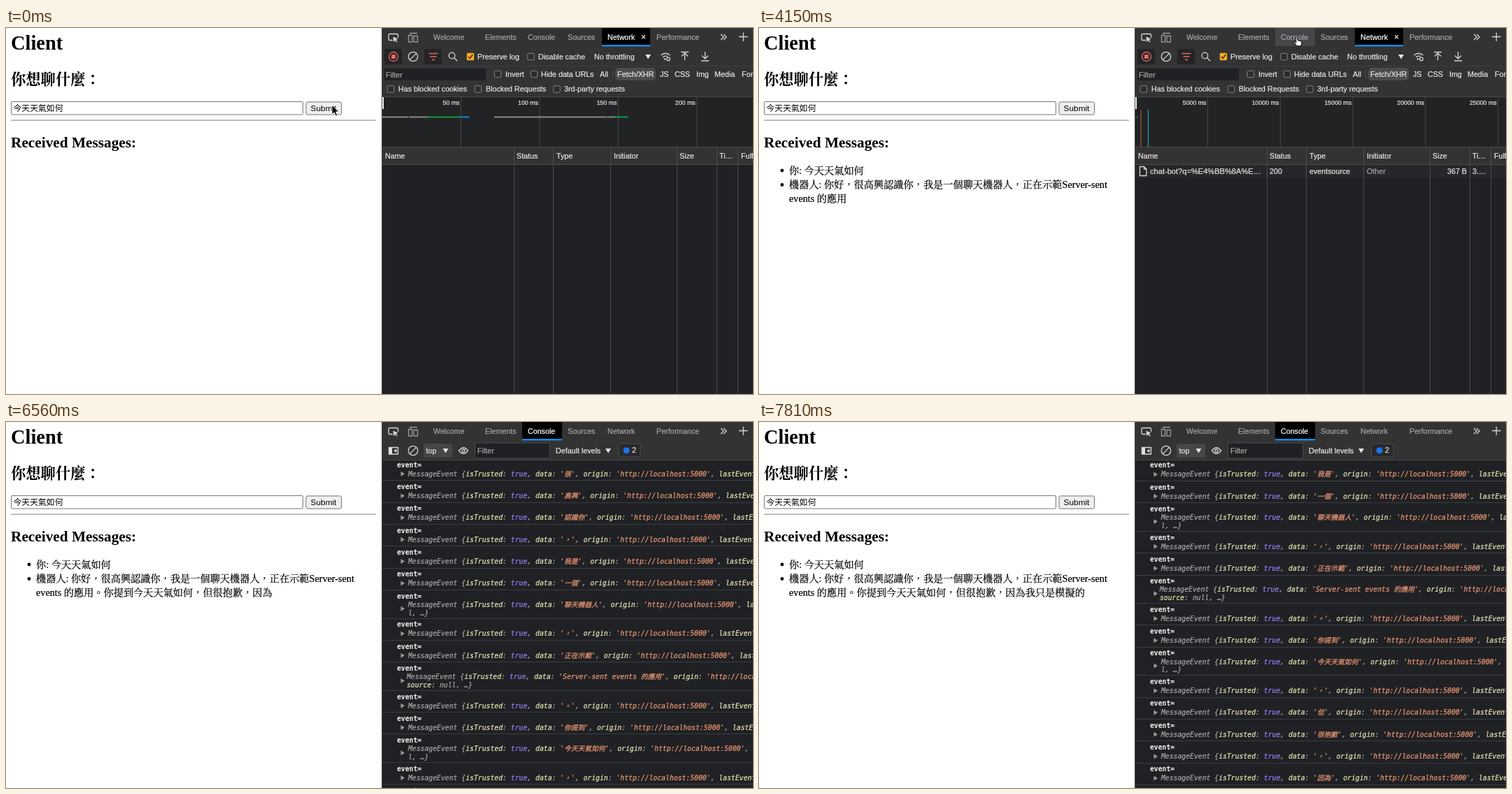
These frames come from a looping animation (1068x524 px, 8000 ms). An HTML page:

```html
<!DOCTYPE html>
<html lang="zh-Hant">
<head>
<meta charset="utf-8">
<title>Client</title>
<style>
  html, body { margin: 0; width: 100%; height: 100%; overflow: hidden; background: #fff; }
  svg { display: block; width: 1068px; height: 524px; }
  text { white-space: pre; }
  /* A hairline stroke in the text colour gives the slightly heavy smoothing. */
  text, tspan { fill: currentColor; stroke: currentColor; stroke-width: .22px; }
  .page { font: 14.2px "Liberation Serif", "Noto Serif CJK TC", "Noto Sans CJK TC", serif; color: #000; }
  .head { font-size: 21.3px; font-weight: 700; stroke: none; }
  .title { font-size: 28.4px; }
  .form { font: 11.83px "Liberation Sans", "Noto Sans CJK TC", sans-serif; color: #000; stroke: none; }
  .ui { font: 10.7px "Liberation Sans", "Noto Sans CJK TC", sans-serif; color: #e8e8e8; }
  .tick { font-size: 8.8px; }
  .dim { color: #a6a6a6; }
  .log { font: 9.76px "DejaVu Sans Mono", "Noto Sans CJK TC", monospace; color: #f4f4f4; }
  .event { font-weight: 700; stroke: none; }
  .obj { font-style: italic; color: #a9a9a9; }
  .key { color: #e9e8b6; }
  .bool { color: #9980ff; }
  .str { color: #ef9a78; }
  .icon { fill: none; stroke: #d6d6d6; stroke-width: 1.3; }
  .red { stroke: #e46962; }
</style>
</head>
<body>
<svg id="stage" viewBox="0 0 1068 524"></svg>
<script>
const LOOP = 8000;
const TOKENS = ['你好', '，', '很', '高興', '認識你', '，', '我是', '一個', '聊天機器人', '，', '正在示範',
  'Server-sent events 的應用', '。', '你提到', '今天天氣如何', '，', '但', '很抱歉', '，', '因為', '我', '只是', '模擬', '的'];
const TIMES = [860, 1160, 1460, 1760, 2060, 2350, 2680, 3010, 3280, 3540, 3890, 4150,
  4470, 4800, 5040, 5300, 5660, 5990, 6230, 6560, 6830, 7180, 7450, 7810];
const SCROLLS = [6230, 6560, 6920, 7180, 7450, 7810];
const QUESTION = '今天天氣如何';
const LONG = 11;              // the message that always wraps
const NARROW_WRAPS = [8, 14]; // messages that wrap once the scrollbar shows

const text = (x, y, s, attrs = '') => `<text x="${x}" y="${y}" ${attrs}>${s}</text>`;
const label = (x, mid, s, cls = '') => text(x, mid + 3.8, s, `class="ui ${cls}"`);
const rect = (x, y, w, h, fill, more = '') =>
  `<rect x="${x}" y="${y}" width="${w}" height="${h}" fill="${fill}" ${more}/>`;
const path = (d, cls = '', more = '') => `<path d="${d}" class="icon ${cls}" ${more}/>`;
const check = (x, y) => rect(x - 4.7, y - 4.7, 9.4, 9.4, '#2c2c2e', 'rx="1.5" stroke="#858585"');
const drop = (x, y) => `<path d="M${x - 4} ${y - 3}h8l-4 6.5z" fill="#e4e4e4"/>`;
const vline = (x, y1, y2, c) => rect(x, y1, 1, y2 - y1, c);
const clearIcon = '<g class="icon"><circle cx="582" cy="41" r="6.7"/><path d="M577.4 45.6L586.6 36.4"/></g>';

function pageMarkup() {
  return rect(0, 0, 537, 524, '#fff') +
    text(7, 31, 'Client', 'class="page head title"') +
    text(7, 81, '你想聊什麼：', 'class="page head"') +
    rect(7.5, 105.5, 417, 18.5, '#fff', 'rx="1.5" stroke="#767676"') +
    text(10.5, 119, QUESTION, 'class="form"') +
    rect(429, 105.9, 50.5, 18.2, '#efefef', 'id="button" rx="2" stroke="#767676"') +
    text(435.6, 119, 'Submit', 'class="form"') +
    rect(7, 131.5, 522, 1.2, '#949494') +
    text(7, 170.6, 'Received Messages:', 'class="page head"') +
    `<g id="asked"><circle cx="33" cy="204" r="2.4"/>${text(43, 208.5, '你: ' + QUESTION, 'class="page"')}</g>` +
    '<g id="reply"><circle cx="33" cy="224.5" r="2.4"/>' +
    text(43, 228.7, '', 'id="line1" class="page"') + text(43, 248.5, '', 'id="line2" class="page"') + '</g>';
}

function tabMarkup() {
  return rect(537, 0, 531, 524, '#202124') + rect(537, 0, 531, 27, '#333334') +
    path('M553 17.5h-4.5q-1.5 0-1.5-1.5v-6q0-1.5 1.5-1.5h10.5q1.5 0 1.5 1.5v4') +
    '<path d="M553.5 12.5l7 3-3 1.2 2.2 2.8-1.3 1-2.2-2.8-1.9 2.5z" fill="#d6d6d6"/>' +
    path('M578 9v-1.5h10M575.5 10.5h5v9.5h-5zM583 11.5h5.5v8.5h-5.5z', '', 'style="stroke:#9a9a9a"') +
    rect(852, 0, 69, 26, '#000', 'id="netTab"') + rect(738, 0, 57, 26, '#000', 'id="conTab"') +
    label(611, 13, 'Welcome', 'dim') + label(685, 13, 'Elements', 'dim') +
    text(746, 16.8, 'Console', 'id="conName" class="ui"') + label(803, 13, 'Sources', 'dim') +
    text(860, 16.8, 'Network', 'id="netName" class="ui"') + label(930, 13, 'Performance', 'dim') +
    path('M909 10.3l5 5m0-5l-5 5', '', 'id="close"') +
    path('M1022 9l4 4-4 4M1026 9l4 4-4 4') + path('M1048 12.5h12.5M1054.2 6.5v12.5') +
    rect(852, 24, 69, 2.5, '#1a86e8', 'id="underline"');
}

function networkMarkup() {
  const heads = [[542, 'Name'], [730, 'Status'], [787, 'Type'], [869, 'Initiator'], [963, 'Size'], [1020, 'Ti…'], [1051, 'Fulfilled']];
  const types = [[849, 'All'], [874, 'Fetch/XHR'], [935, 'JS'], [956, 'CSS'], [987, 'Img'], [1013, 'Media'], [1052, 'Font']];
  const put = (list, mid) => list.map(([x, s]) => label(x, mid, s)).join('');
  const ticks = (first, gap, n, step) => Array.from({ length: n }, (_, i) => {
    const x = first + gap * i;
    return vline(x, 99, 170, '#46474a') + text(x - 1.5, 110.2, `${step * (i + 1)} ms`, 'class="ui tick" text-anchor="end"');
  }).join('');
  const bar = (x1, x2, c) => rect(x1, 126.5, x2 - x1, 2, c);
  return rect(537, 27, 531, 71, '#333334') + rect(537, 54, 531, 1, '#3d3d3f') +
    rect(541, 30, 25, 22, '#242426', 'rx="2"') + rect(598, 30, 25, 22, '#242426', 'rx="2"') +
    '<circle cx="554" cy="41" r="6.5" class="icon red"/><rect x="551" y="38" width="6" height="6" rx="1" fill="#e46962"/>' +
    clearIcon + path('M604.5 36.5h13M606.5 41h9M609 45.5h4', 'red') +
    '<circle cx="637.5" cy="39.5" r="4.3" class="icon"/>' + path('M640.7 42.8l4.5 4.5') +
    rect(658.8, 35.8, 10.4, 10.4, '#f9ab17', 'rx="1.5"') + path('M661 41l2.3 2.5 4-5.5', '', 'style="stroke:#222"') +
    label(674, 41, 'Preserve log') + check(750.5, 41) + label(761, 41, 'Disable cache') +
    label(841, 41, 'No throttling') + drop(918, 41) +
    path('M936.5 39q6.5-5.5 13 0M939 42q3.5-3 7-1') + '<circle cx="942" cy="44.5" r="1.3" fill="#d6d6d6"/><circle cx="947" cy="44.5" r="2.3" class="icon"/>' +
    path('M970.5 46v-9.5M966 40.5l4.5-4.5 4.5 4.5M965 34.5h11') +
    path('M999.5 34v9.5M995 39.5l4.5 4.5 4.5-4.5M994 47h11') +
    rect(541, 58, 145, 17, '#202124') + label(543, 67, 'Filter', 'dim') +
    check(703, 66) + label(714, 66, 'Invert') + check(755, 66) + label(765, 66, 'Hide data URLs') +
    vline(867, 60, 73, '#4a4a4c') + rect(871, 57, 58, 18, '#4b4c4e', 'rx="5"') + put(types, 66) +
    check(550, 87.5) + label(561, 87.5, 'Has blocked cookies') + check(675, 87.5) +
    label(686, 87.5, 'Blocked Requests') + check(787.5, 87.5) + label(798, 87.5, '3rd-party requests') +
    rect(537, 98, 531, 73, '#222325') + rect(537, 98, 531, 1, '#46474a') +
    '<g id="before">' + ticks(650, 112.4, 4, 50) +
    bar(538, 575, '#8a8a8a') + bar(576, 603, '#8a8a8a') + bar(603, 650, '#0c9c3e') + bar(651, 662, '#1b88dc') +
    bar(698, 858, '#8a8a8a') + bar(859, 871, '#8a8a8a') + bar(871, 888, '#0c9c3e') + bar(888, 889.5, '#1b88dc') + '</g>' +
    '<g id="after">' + ticks(641, 103.8, 5, 5000) + rect(538, 127, 4, 1.5, '#49555f') +
    vline(545.5, 117, 170, '#b5673f') + vline(556, 117, 170, '#16b9c2') + '</g>' +
    rect(538, 99, 2, 17, '#f2f2f2') +
    rect(537, 170, 531, 26, '#333334') + rect(537, 170, 531, 1, '#4a4b4d') + rect(537, 195, 531, 1, '#4a4b4d') +
    put(heads, 183.5) +
    '<g id="request">' + rect(537, 196, 531, 19, '#26272a') +
    path('M544.5 198.5h6l3.5 3.5v9.5h-9.5zM550.5 198.5v3.5h3.5') +
    text(559, 209, 'chat-bot?q=%E4%BB%8A%E…', 'class="ui" style="font-size:11.1px"') +
    label(730, 205.2, '200') + label(787, 205.2, 'eventsource') + label(869, 205.2, 'Other', 'dim') +
    text(1012, 209, '', 'id="size" class="ui" text-anchor="end"') + text(1020, 209, '', 'id="took" class="ui"') + '</g>' +
    [726, 782, 864, 959, 1016, 1046].map(x => vline(x, 171, 524, '#4a4b4d')).join('');
}

function consoleMarkup() {
  return rect(537, 55, 531, 469, '#202124') + '<g id="rows"></g>' +
    rect(537, 27, 531, 28, '#333334') + rect(537, 54, 531, 1, '#47484a') +
    path('M547.5 36.5h13v9.5h-13z') + '<path d="M548 37h4v9h-4zM558.5 38.5v5.5l-4-2.7z" fill="#e0e0e0"/>' +
    clearIcon + rect(597, 31, 41, 20, '#464648', 'rx="2"') + label(600.5, 41, 'top') + drop(628.5, 41) +
    path('M647.5 41q6.5-8.5 13 0q-6.5 8.5-13 0z') + '<circle cx="654" cy="41" r="2" class="icon"/>' +
    rect(670.5, 30, 107, 22, '#202124', 'stroke="#4a4a4c"') + label(674, 41, 'Filter', 'dim') +
    label(786, 41, 'Default levels') + drop(861, 41) +
    rect(875.5, 31, 31.5, 19, '#2a2a2c', 'rx="2" stroke="#4a4a4c"') +
    '<circle cx="887" cy="40.7" r="4.5" fill="#1a73e8"/>' + label(895, 40, '2');
}

const cursorMarkup = '<g id="arrow"><path d="M0 0v14l3.2-3 2.3 5 2.4-1-2.3-5h4.4z" fill="#000" stroke="#fff"/></g>' +
  '<g id="hand"><path d="M3.5 0.8q1.5-0.8 2 0.8l0.7 4 4.6 1.4q1.3 0.5 1 2.3l-0.8 4.5h-6l-3.8-5q-0.6-1.5 1-1.2l1.7 1.4z" fill="#fff" stroke="#000"/></g>';

const stage = document.getElementById('stage');
stage.innerHTML = tabMarkup() + `<g id="net">${networkMarkup()}</g><g id="con">${consoleMarkup()}</g>` +
  pageMarkup() + rect(537, 0, 1, 524, '#48494b') + cursorMarkup;
const el = {};
stage.querySelectorAll('[id]').forEach(n => { el[n.id] = n; });

const show = (node, on) => node.setAttribute('display', on ? 'inline' : 'none');
const passed = (list, t) => list.filter(x => x <= t).length;
const span = (cls, s) => `<tspan class="${cls}">${s}</tspan>`;

// Bytes of one server-sent event including its chunk framing.
function eventBytes(s) {
  const n = new TextEncoder().encode(s).length + 8;
  return n + (n > 15 ? 6 : 5);
}

function logRow(i, y, narrow) {
  const wraps = i === LONG || (narrow && NARROW_WRAPS.includes(i));
  const x = i === LONG ? 573 : 575;
  const mid = y + (wraps ? 18 : 13);
  const body = `MessageEvent {${span('key', 'isTrusted')}: ${span('bool', 'true')}, ${span('key', 'data')}: ` +
    `${span('str', `'${TOKENS[i]}'`)}, ${span('key', 'origin')}: ${span('str', "'http://localhost:5000'")}, ` +
    `${span('key', 'lastEventId')}: `;
  const tail = i === LONG ? `${span('key', narrow ? 'source' : 'ource')}: null, …}` : 'l, …}';
  const height = wraps ? 40.6 : 31.33;
  const svg = text(559, y + 3.4, 'event=', 'class="log event"') +
    `<path d="M564.5 ${mid - 3.5}v7l5.5-3.5z" fill="#9a9a9a"/>` +
    text(x, y + (wraps ? 15.6 : 16.4), body, 'class="log obj"') +
    (wraps ? text(x, y + 27.4, tail, 'class="log obj"') : '') +
    rect(538, Math.round(y + height - 9.3), 530, 1, '#3b3c3f');
  return { svg, height };
}

function logMarkup(t) {
  const narrow = t >= 5040;
  const top = passed(SCROLLS, t);
  const count = narrow ? TOKENS.length : t < 4890 ? 13 : 14;
  let y = t < 5990 ? 64 : 61 + top * 0.15;
  let out = '';
  for (let i = top; i < count && y < 530; i++) {
    const row = logRow(i, y, narrow);
    out += row.svg;
    y += row.height;
  }
  if (!narrow) out += path(`M549 ${y - 3}l4 3-4 3`, '', 'style="stroke:#2b7de0"') + rect(560, y - 5.5, 1, 11, '#eee');
  return out;
}

function pointer(t) {
  if (t < 2920) return [466, 110];
  if (t < 3010) return [470, 98];
  if (t < 3280) return [475, 83];
  if (t < 5040) {
    const p = Math.min(1, Math.floor((t - 3280) / 86) / 8);
    const e = p * p * (3 - 2 * p);
    return [481 + 283 * e, 63 - 51 * e];
  }
  const k = Math.floor((t - 5040) / 87);
  return t < 5300 ? [764 + 8 * k, 12 - 7 * k] : null;
}

function draw(t) {
  const n = passed(TIMES, t);
  const onConsole = t >= 4800;
  const at = pointer(t);

  const parts = TOKENS.slice(0, n).join('').split('sent ');
  el.line1.textContent = '機器人: ' + parts[0] + (parts.length > 1 ? 'sent' : '');
  el.line2.textContent = parts[1] || '';
  show(el.asked, t >= 500);
  show(el.reply, t >= 620);
  const focused = t >= 500 && t < 2920;
  el.button.setAttribute('fill', focused ? '#e3e3e3' : '#efefef');
  el.button.setAttribute('stroke', focused ? '#555' : '#767676');

  show(el.net, !onConsole);
  show(el.con, onConsole);
  show(el.before, t < 620);
  show(el.after, t >= 620);
  show(el.request, t >= 620);
  const bytes = TOKENS.slice(0, Math.max(0, n - 1)).reduce((sum, s) => sum + eventBytes(s), 149);
  el.size.textContent = `${n ? bytes : 0} B`;
  el.took.textContent = !n ? 'Pe…' : n < 4 ? `${n * 3}…` : `${Math.floor(n * 3 / 10)}.…`;
  if (onConsole) el.rows.innerHTML = logMarkup(t);

  const hover = at && at[0] > 735 && at[0] < 795 && at[1] < 26;
  show(el.netTab, !onConsole);
  show(el.close, !onConsole);
  show(el.conTab, onConsole || hover);
  el.conTab.setAttribute('fill', hover ? '#464648' : '#000');
  el.conName.style.color = onConsole ? '#fff' : '#a6a6a6';
  el.netName.style.color = onConsole ? '#a6a6a6' : '#fff';
  el.underline.setAttribute('x', !onConsole ? 852 : t < 4890 ? 752 : 738);
  el.underline.setAttribute('width', onConsole ? 57 : 69);

  show(el.arrow, at && !hover);
  show(el.hand, hover);
  if (at) for (const c of [el.arrow, el.hand]) c.setAttribute('transform', `translate(${at[0]} ${at[1]})`);
}

let start = null, last = -1;
function tick(now) {
  if (start === null) start = now;
  // Everything moves in steps of at least 10 ms.
  const t = Math.floor(((now - start) % LOOP) / 10) * 10;
  if (t !== last) draw(last = t);
  requestAnimationFrame(tick);
}
draw(0);
requestAnimationFrame(tick);
</script>
</body>
</html>
```
